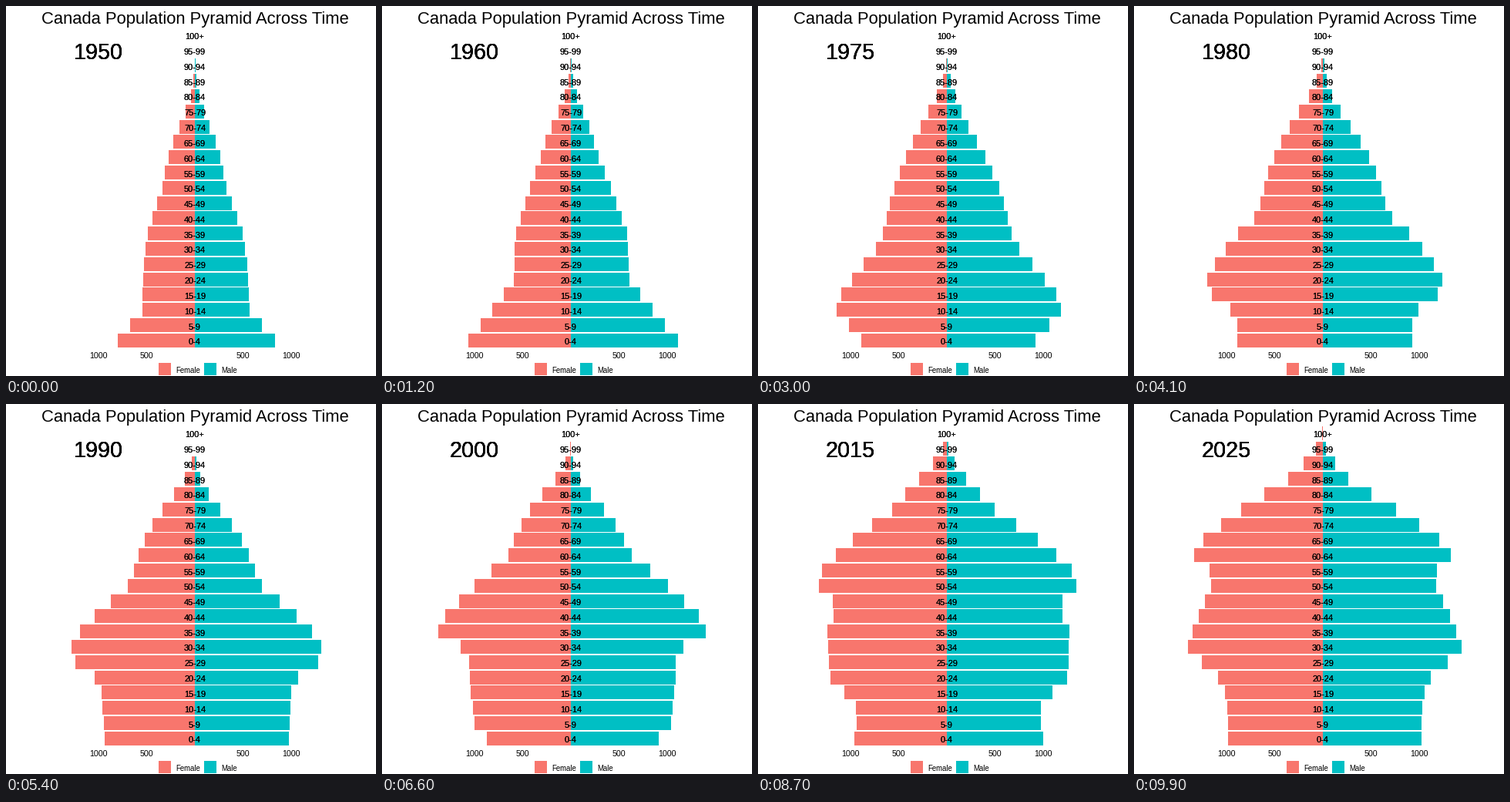
Animation of 480x480 px, one loop 10000 ms. Source, as a matplotlib script:

```python
import matplotlib.pyplot as plt
import numpy as np
from matplotlib.animation import FuncAnimation

plt.rcParams["font.family"] = "Liberation Sans"

SIZE, FRAMES = 480, 100
MID, BASE, STEP, BAR = 245, 433.8, 19.8, 17.82
PINK, TEAL = "#F8766D", "#00BFC4"
AGES = [f"{a}-{a + 4}" for a in range(0, 100, 5)] + ["100+"]

# Time, age and cohort are counted in five-year units from 1950.
# Newborns per cohort, in pixels of bar length.
BIRTHS = [(-17, 12), (-13, 30), (-10, 35), (-5, 57.5), (-2, 67), (0, 104), (2, 142), (3, 143),
          (4, 119), (5, 112), (9, 125), (10, 114), (11, 109), (13, 125), (15, 128)]
# Share added to each cohort by immigration before its late thirties.
ARRIVALS = [(-2, .3), (0, .25), (2, .18), (5, .34), (8, .43), (10, .66), (11, .6), (13, .15)]


def curve(points, x):
    return np.interp(x, *zip(*points))


def population(scale, extra, lifespan, first, gain, spread):
    """Bar lengths by time and age: births, immigration and Gompertz mortality.

    Lifespan grows by `gain` per cohort, starting with cohort `first`.
    """
    time, age = np.mgrid[0:16, 0:21]
    cohort = time - age
    joined = 1 + (curve(ARRIVALS, cohort) + extra) * np.minimum(age / 7, 1) ** 1.3
    limit = lifespan + gain * np.maximum(cohort - first, 0)
    alive = np.exp(-np.exp((age - limit) / spread))
    return scale * curve(BIRTHS, cohort) * joined * alive


women = population(.96, .02, lifespan=15.4, first=-13, gain=.23, spread=2)
men = population(1, 0, lifespan=15.35, first=-9, gain=.25, spread=2.25)


def at(grid, pos):
    i = min(int(pos), len(grid) - 2)
    return grid[i] + (grid[i + 1] - grid[i]) * (pos - i)


fig = plt.figure(figsize=(4.8, 4.8), dpi=100, facecolor="white")
ax = fig.add_axes([0, 0, 1, 1])
ax.set(xlim=(0, SIZE), ylim=(SIZE, 0))
ax.axis("off")


def write(x, y, text, px, ha="center", copies=1):
    return [ax.text(x, y, text, size=px * .72, ha=ha, va="baseline", color="black")
            for _ in range(copies)]


def box(x, y, w, h, color):
    return ax.add_patch(plt.Rectangle((x, y), w, h, fc=color, lw=0))


rows = [BASE - STEP * k for k in range(len(AGES))]
left = [box(MID, y - BAR / 2, 0, BAR, PINK) for y in rows]
right = [box(MID, y - BAR / 2, 0, BAR, TEAL) for y in rows]

for y, name in zip(rows, AGES):
    write(MID, y + 5.5, name, 11, copies=2)
write(MID, 23, "Canada Population Pyramid Across Time", 22)
year_text = write(120, 68.6, "1950", 28.7, copies=4)

for value in (-1000, -500, 500, 1000):
    write(MID + value / 8, 457, str(abs(value)), 10.6)
for x, color, name in ((198, PINK, "Female"), (257, TEAL, "Male")):
    box(x, 463, 16, 16, color)
    write(x + 22, 476, name, 9.6, ha="left")


def draw(frame):
    pos = 15 * frame / (FRAMES - 1)
    for bar, w in zip(left, at(women, pos)):
        bar.set_x(MID - w)
        bar.set_width(w)
    for bar, w in zip(right, at(men, pos)):
        bar.set_width(w)
    for label in year_text:
        label.set_text(str(1950 + 5 * round(pos)))
    return left + right + year_text


anim = FuncAnimation(fig, draw, frames=FRAMES, interval=100, repeat=True)
plt.show()
```
